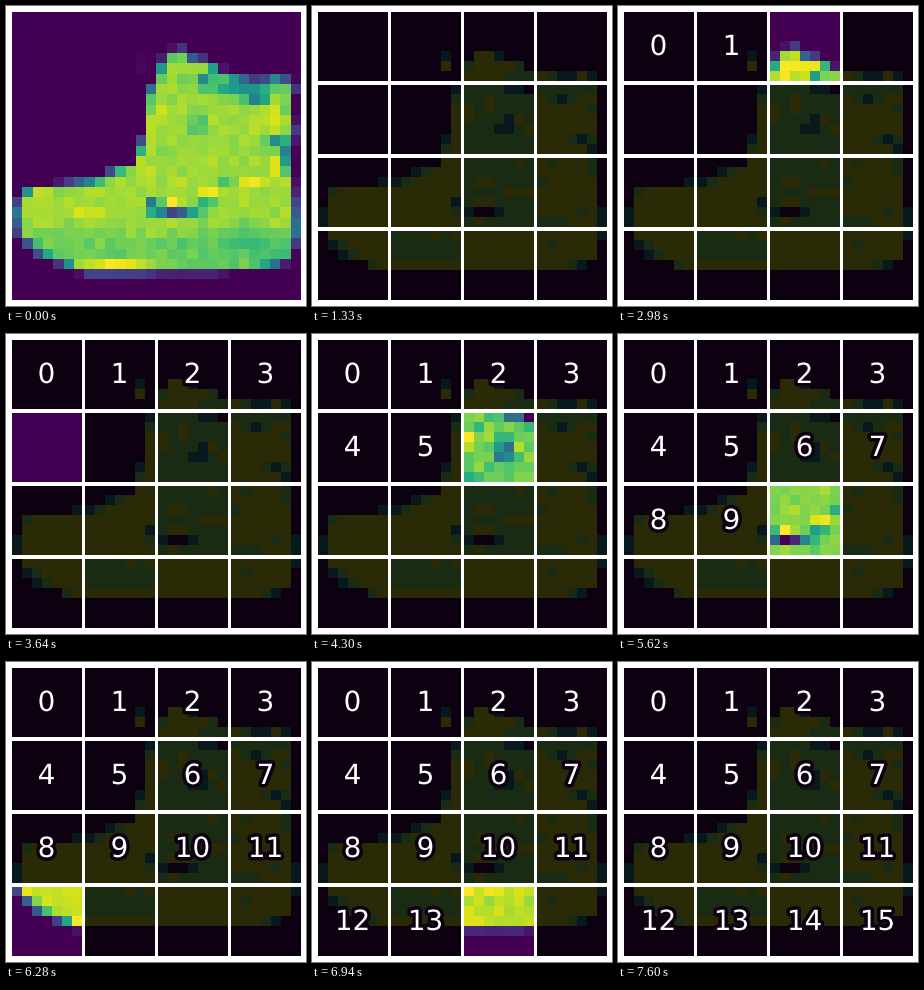
Recreate the animation shown at these times as a matplotlib script. Size 300x300 px, loop 7930 ms.

```python
import numpy as np
import matplotlib.pyplot as plt
from matplotlib.animation import FuncAnimation
from matplotlib.path import Path
from matplotlib.patheffects import withStroke

SIZE = 300
GRID, CELLS = 4, 7
N = GRID * CELLS
MARGIN, PITCH, PATCH_W, PATCH_H = 6, 73, 70, 69

LOOP, INTERVAL = 7930, 10
SPLIT_AT, SCAN_AT, STEP = 1330, 2320, 330

VIRIDIS = plt.get_cmap("viridis")
SHADE = "#0d0011"
DIM_TINTS = np.array([[13, 0, 17], [7, 25, 28], [26, 43, 20], [42, 42, 6]], np.uint8)
DIM_LEVELS = [0.235, 0.52, 0.84]

# Key points of the silhouette, in grid cells, clockwise from the toe.
OUTLINE = [
    (0.5, 19), (1.7, 17), (4, 17), (8, 16.4), (9, 16), (11, 15), (12, 15),
    (12, 14), (13, 12), (13.1, 8), (14, 7), (14.5, 5), (16.2, 3.5),
    (17, 4.6), (19, 4.9), (20.2, 5.9), (24, 6.9), (25.5, 6.3), (27.3, 7),
    (26.8, 9), (27.3, 12), (26.4, 13.5), (27, 16), (27.5, 21.5), (26.8, 24),
    (24, 25), (13, 25.2), (7, 25.2), (2.7, 23.5), (0.7, 21.5),
]

# Soft marks on the leather: centre x, y, radius x, y, change of tone.
SHADOWS = [
    (18.5, 6.5, 0.8, 0.6, -90), (22.5, 7.3, 3.6, 0.9, -95),
    (23.7, 8.5, 1.1, 0.6, -95), (18, 11.2, 1, 1.2, -40),
    (25.6, 12.5, 0.9, 0.5, -105), (13.7, 18.5, 0.7, 0.35, -140),
    (15.8, 19.5, 2, 0.4, -165), (18.8, 18.5, 1, 0.4, -55),
    (20.8, 16.5, 0.8, 0.4, -45), (22.8, 22.2, 3.2, 1.5, -22),
]
SHINE = [
    (19, 17.5, 1, 0.4, 40), (23, 16.5, 1.3, 0.4, 32),
    (25.5, 10, 0.5, 2, 26), (25.5, 15, 0.5, 0.8, 36),
    (15.5, 18.5, 0.6, 0.4, 40), (7.5, 19.5, 2, 0.4, 22),
    (9.5, 24.5, 4.5, 0.6, 55),
]


def coverage(points, fine=8):
    """Share of each grid cell that lies inside the outline."""
    axis = (np.arange(N * fine) + 0.5) / fine
    x, y = np.meshgrid(axis, axis)
    inside = Path(points).contains_points(np.column_stack([x.ravel(), y.ravel()]))
    return inside.reshape(N, fine, N, fine).mean(axis=(1, 3))


def make_boot():
    rng = np.random.default_rng(4)
    x, y = np.meshgrid(np.arange(N) + 0.5, np.arange(N) + 0.5)
    tone = np.interp(y, [20, 22.5, 25], [219, 197, 190]) + rng.normal(0, 6, (N, N))
    for cx, cy, rx, ry, gain in SHADOWS + SHINE:
        tone += gain * np.exp(-((x - cx) / rx) ** 2 - ((y - cy) / ry) ** 2)
    boot = coverage(OUTLINE) * np.clip(tone, 0, 255)
    boot[4:6, 12] = 3, 6  # faint specks beside the collar
    return boot


def enlarge(cells, w, h, phase=0.5):
    def pick(length, count):
        return ((np.arange(length) + phase) * count / length).astype(int)
    return cells[np.ix_(pick(h, len(cells)), pick(w, cells.shape[1]))]


def colorize(scaled):
    return (VIRIDIS(scaled)[..., :3] * 255).round().astype(np.uint8)


def patch_looks(values):
    """Return the bright and the dimmed picture of one patch."""
    scaled = (values - values.min()) / max(np.ptp(values), 1)
    dim = DIM_TINTS[np.digitize(scaled, DIM_LEVELS)]
    return [enlarge(look, PATCH_W, PATCH_H, 0.95) for look in (colorize(scaled), dim)]


def corner(k):
    row, col = divmod(k, GRID)
    return MARGIN + col * PITCH, MARGIN + row * PITCH


def paste(canvas, picture, x, y):
    h, w = picture.shape[:2]
    canvas[y:y + h, x:x + w] = picture


fig = plt.figure(figsize=(3, 3), dpi=100, facecolor="white")
ax = fig.add_axes([0, 0, 1, 1])
ax.axis("off")

boot = make_boot()
blank = np.full((SIZE, SIZE, 3), 255, np.uint8)
whole, tiled = blank.copy(), blank.copy()
paste(whole, enlarge(colorize(boot / boot.max()), 289, 288), MARGIN, MARGIN)

lit, labels = [], []
for k in range(GRID * GRID):
    row, col = (CELLS * n for n in divmod(k, GRID))
    bright, dim = patch_looks(boot[row:row + CELLS, col:col + CELLS])
    x, y = corner(k)
    lit.append(bright)
    paste(tiled, dim, x, y)
    labels.append(ax.text(
        x + PATCH_W / 2 - 0.5, y + 43, str(k), color="white", fontsize=20,
        family="DejaVu Sans", ha="center", va="baseline",
        path_effects=[withStroke(linewidth=5, foreground=SHADE)]))

stage = ax.imshow(whole, extent=(0, SIZE, SIZE, 0), aspect="auto",
                  interpolation="nearest")


def update(i):
    t = i * INTERVAL
    current = (t - SCAN_AT) // STEP
    canvas = (whole if t < SPLIT_AT else tiled).copy()
    if current >= 0:
        paste(canvas, lit[current], *corner(current))
    stage.set_data(canvas)
    for k, label in enumerate(labels):
        label.set_visible(k < current)
    return [stage, *labels]


def clamp_scan():
    """The scan ends one step before the loop, when every label is shown."""
    lit.append(np.empty((0, 0, 3), np.uint8))


clamp_scan()
anim = FuncAnimation(fig, update, frames=LOOP // INTERVAL, interval=INTERVAL,
                     repeat=True, repeat_delay=0, blit=False)
plt.show()
```
